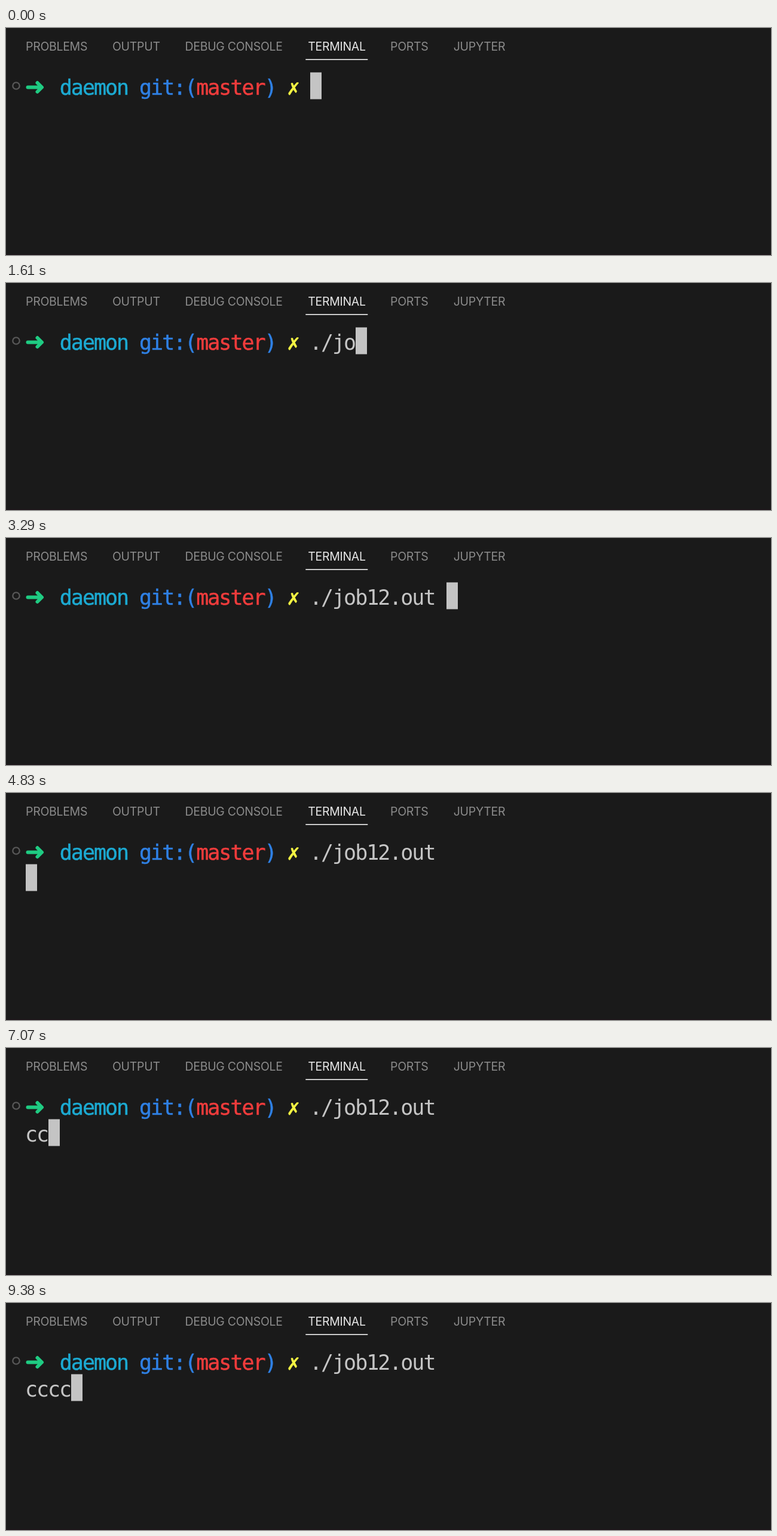
An HTML page for the animation above (9.45 s loop, 1280 by 381 pixels).

```html
<!DOCTYPE html>
<html lang="en">
<head>
<meta charset="utf-8">
<title>Terminal session</title>
<style>
  html, body { margin: 0; width: 100%; height: 100%; overflow: hidden; background: #1a1a1a; }
  svg { display: block; width: 100vw; height: 100vh; }
  .tab { font: 400 19.5px Inter, "Liberation Sans", sans-serif; letter-spacing: -0.3px; fill: #8b8b8b; }
  .tab.active { fill: #e7e7e7; }
  .cell { font: 400 35px "DejaVu Sans Mono", "Noto Sans Mono", monospace; text-anchor: middle; }
  .bold { stroke-width: 0.5; }
  .mark { fill: none; stroke: #1fcb82; stroke-width: 6; stroke-linecap: round; stroke-linejoin: round; }
</style>
</head>
<body>
<svg id="stage" viewBox="0 0 1280 381" preserveAspectRatio="none">
  <rect width="1280" height="381" fill="#1a1a1a"/>
  <rect y="380" width="1280" height="1" fill="#20131a"/>
  <g id="tabs"></g>
  <rect x="501.3" y="52" width="104" height="1.7" fill="#e7e7e7"/>
  <circle cx="17" cy="97" r="5.7" fill="none" stroke="#585858" stroke-width="2.3"/>
  <path class="mark" d="M36.5 99.5H58M52.5 92L60 99.5L52.5 107"/>
  <g id="prompt"></g>
  <g id="typed"></g>
  <g id="printed"></g>
  <rect id="cursor" width="19" height="45" fill="#c4c4c4"/>
</svg>
<script>
const NS = "http://www.w3.org/2000/svg";
const LOOP = 9450, STEP = 70;
const LEFT = 33, TOP = 74.5, BASELINE = 111.7, CELL = 19.04, ROW = 45;
const INPUT_COL = 25, TEXT = "#c5c5c5";
const COMMAND = "./job12.out ";
const ENTER = 4620;

// [time, number of command characters on screen]; the last step is a completion
const KEYS = [[770, 1], [1050, 2], [1330, 3], [1540, 4], [1750, 5], [2100, 6], [2310, 7], [2590, 12]];

const byId = id => document.getElementById(id);

function addText(parent, text, attrs) {
  const node = document.createElementNS(NS, "text");
  for (const name in attrs) node.setAttribute(name, attrs[name]);
  node.textContent = text;
  parent.appendChild(node);
}

// Each glyph is centred in its own terminal cell; bold ones sit slightly to the right.
function addCells(parent, text, col, row, color, bold) {
  const shift = bold ? 0.7 : 0;
  const xs = [...text].map((_, i) => (LEFT + shift + (col + i + 0.5) * CELL).toFixed(2));
  addText(parent, text, {
    class: bold ? "cell bold" : "cell",
    x: xs.join(" "),
    y: BASELINE + row * ROW,
    fill: color,
    stroke: bold ? color : "none"
  });
}

const tabs = [["PROBLEMS", 33], ["OUTPUT", 178], ["DEBUG CONSOLE", 299.5],
  ["TERMINAL", 505.2], ["PORTS", 643], ["JUPYTER", 748.7]];
for (const [name, x] of tabs) {
  addText(byId("tabs"), name, { class: name === "TERMINAL" ? "tab active" : "tab", x, y: 37.5 });
}

const prompt = [["daemon", 3, "#1caad2"], ["git:(", 10, "#2f80e4"],
  ["master", 15, "#f03c3c"], [")", 21, "#2f80e4"], ["✗", 23, "#f5f543"]];
for (const [text, col, color] of prompt) addCells(byId("prompt"), text, col, 0, color, true);

let shown = "";

function draw(time) {
  const t = Math.floor((time % LOOP) / STEP) * STEP;
  const typed = KEYS.reduce((n, [at, count]) => t >= at ? count : n, 0);
  const entered = t >= ENTER;
  // The running job prints one letter per second.
  const printed = entered ? Math.floor((t - ENTER) / 1000) : 0;

  const state = [typed, entered, printed].join();
  if (state === shown) return;
  shown = state;

  byId("typed").replaceChildren();
  byId("printed").replaceChildren();
  addCells(byId("typed"), COMMAND.slice(0, typed).trim(), INPUT_COL, 0, TEXT);
  addCells(byId("printed"), "c".repeat(printed), 0, 1, TEXT);

  const col = entered ? printed : INPUT_COL + typed;
  byId("cursor").setAttribute("x", Math.round(LEFT + col * CELL));
  byId("cursor").setAttribute("y", TOP + (entered ? ROW : 0));
}

const start = performance.now();
function tick() {
  draw(performance.now() - start);
  requestAnimationFrame(tick);
}
tick();
</script>
</body>
</html>
```
